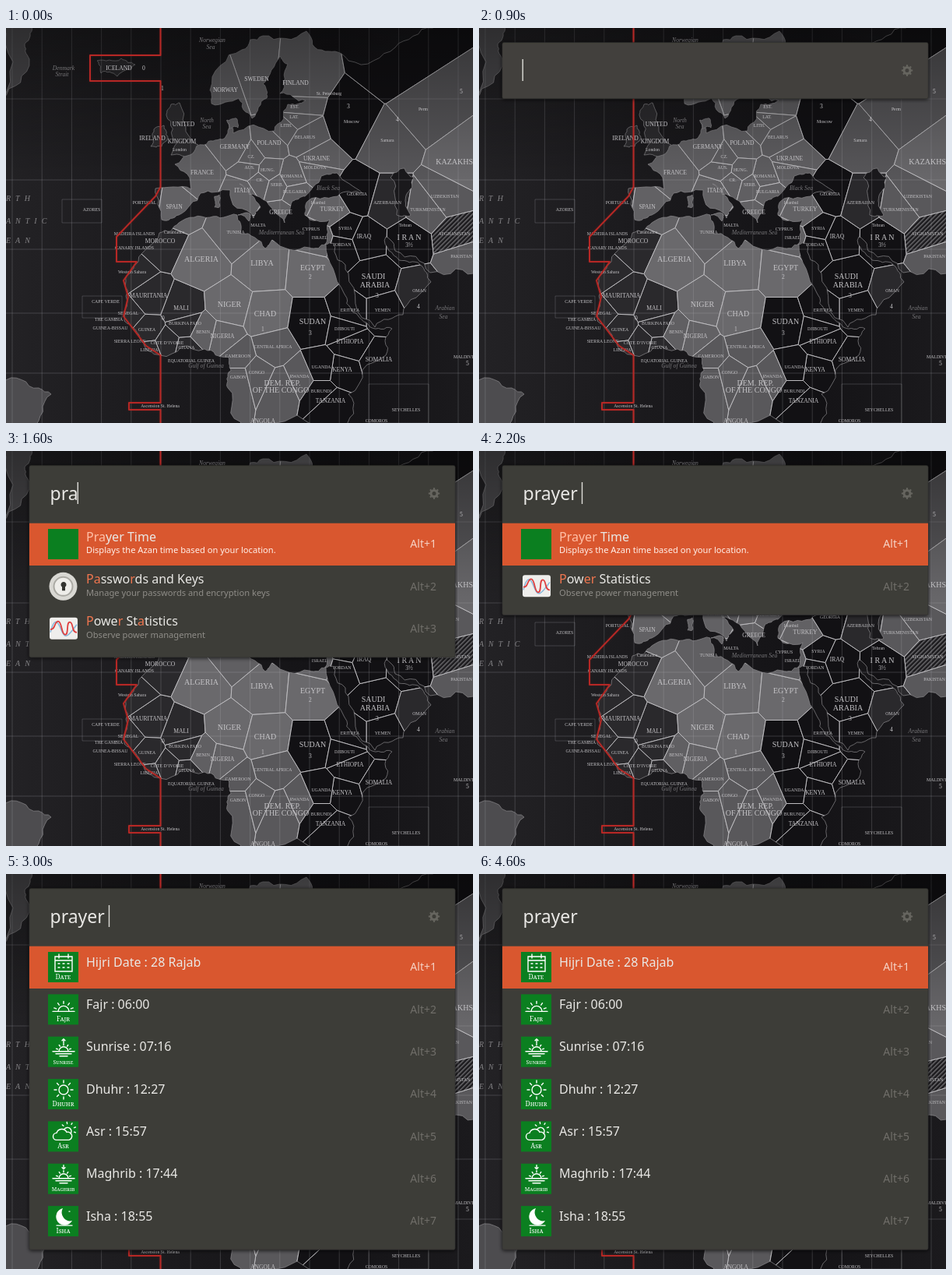
Animation of 600x507 px, one loop 4800 ms. Source, as an HTML page:

```html
<!DOCTYPE html>
<html lang="en">
<head>
<meta charset="utf-8">
<title>Launcher</title>
<style>
  html, body { margin: 0; width: 100%; height: 100%; overflow: hidden; background: #1b1a1d; }
  svg { display: block; width: 600px; height: 507px; }
  #countries { stroke: #bdbcbf; stroke-width: 1; }
  #coasts, #water { stroke: #8b8a8d; stroke-width: .7; stroke-linejoin: round; }
  #labels { font-family: "Liberation Serif", serif; fill: #c4c3c6; text-anchor: middle; }
  #labels .sea { font-style: italic; fill: #777679; }
  #ocean { font: italic 10px "Liberation Serif", serif; fill: #858487; letter-spacing: 6px; }
  #panel text { font-family: "Noto Sans", sans-serif; fill: #e9e8e5; white-space: pre; }
  #panel .query { font-size: 23px; }
  #panel .title { font-size: 16px; }
  #panel .title tspan { fill: #f0764f; }
  #panel .sub { font-size: 11.15px; fill: #8f8d88; }
  #panel .key { font-size: 14px; fill: #706e69; text-anchor: end; }
  #panel .on .title tspan { fill: #ffbfa6; }
  #panel .on .sub { fill: #fff0ea; }
  #panel .on .key { fill: #f6d3c6; }
  #panel .caption { font: small-caps 8.5px "Noto Serif", serif; fill: #fff; text-anchor: middle; }
  .line { fill: none; stroke: #fff; stroke-width: 1.4; stroke-linecap: round; }
</style>
</head>
<body>
<svg viewBox="0 0 600 507">
  <defs>
    <linearGradient id="sea">
      <stop offset="0" stop-color="#232225"/>
      <stop offset=".35" stop-color="#1b1a1d"/>
      <stop offset=".7" stop-color="#141316"/>
      <stop offset="1" stop-color="#1b1a1d"/>
    </linearGradient>
    <linearGradient id="dusk" x2="0" y2="1">
      <stop offset="0" stop-opacity=".4"/>
      <stop offset=".4" stop-opacity="0"/>
    </linearGradient>
    <pattern id="hatch" width="4" height="4" patternUnits="userSpaceOnUse" patternTransform="rotate(45)">
      <rect width="4" height="4" fill="#1b1a1d"/><rect width="1.5" height="4" fill="#6b6a6d"/>
    </pattern>
    <filter id="shadow" x="-10%" y="-20%" width="120%" height="140%">
      <feDropShadow dx="0" dy="1" stdDeviation="2.5" flood-color="#000" flood-opacity=".75"/>
    </filter>
    <clipPath id="land"><path id="landShape"/></clipPath>
  </defs>
  <rect width="600" height="507" fill="url(#sea)"/>
  <g id="countries" clip-path="url(#land)"></g>
  <g id="coasts"></g>
  <g id="water" fill="#1a191c"></g>
  <path id="grid" stroke="#b5b4b7" stroke-width=".8" opacity=".3"/>
  <rect width="600" height="507" fill="url(#dusk)"/>
  <g id="labels"></g>
  <g id="ocean"><text y="222">RTH</text><text y="251">ANTIC</text><text y="276">EAN</text></g>
  <g fill="none" stroke-linejoin="round">
    <path id="route" stroke="#b62825" stroke-width="2" d="M198.5 0V35H108V68H198.5V204L192 216 142 268V300H168L151 324 157 345 151 370 180 408 198.5 420V481H158V490H198.5V507"/>
    <use href="#route" opacity=".25" style="filter: blur(1.5px)"/>
  </g>
  <g id="panel"></g>
</svg>
<script>
const $ = id => document.getElementById(id);
const DURATION = 4800;

// ---- Coasts: a few key points, broken up by seeded midpoint displacement ----
let seed = 7;
const random = () => (seed = seed * 16807 % 2147483647) / 2147483647;

function roughen(a, b, depth) {
  if (!depth) return [b];
  const shift = (random() - .5) * .35;
  const middle = [(a[0] + b[0]) / 2 + (b[1] - a[1]) * shift, (a[1] + b[1]) / 2 - (b[0] - a[0]) * shift];
  return [...roughen(a, middle, depth - 1), ...roughen(middle, b, depth - 1)];
}
const toPath = points => `M${points.map(p => p.map(n => n.toFixed(1)).join(' ')).join('L')}Z`;
function coast(text) {
  const points = text.split(' ').map(pair => pair.split(',').map(Number));
  return toPath(points.flatMap((p, i) => roughen(p, points[(i + 1) % points.length], 3)));
}

const africa = coast('197,263 222,250 262,243 297,240 301,264 333,283 342,272 390,282 411,277 434,340 446,365 468,384 496,386 488,420 440,470 440,520 308,520 285,462 289,440 285,422 255,412 198,420 175,402 152,376 154,325 170,300');
const europe = '192,206 238,207 217,175 255,150 278,143 284,118 292,135 345,132 362,98 385,93 352,84 362,46 352,36 330,72 335,90 316,116 299,90 264,97 262,80 303,28 330,10 386,4 410,30 440,42 500,25 548,0';
const asia = '610,-9 610,318 545,314 500,286 488,268 505,298 532,304 546,326 510,368 474,384 440,315 420,276 410,278 416,246 384,240 388,222 430,212 458,212 425,186 405,190 384,216 368,222 358,250 330,220 300,200 327,230 318,244 288,208 250,212 222,240 200,246';
const mainland = coast(`${europe} ${asia}`);
const islands = {
  '#4d4c4f': ['-5,-5 34,-5 26,18 30,40 -5,92', '-5,455 42,462 58,470 32,512 -5,512'],
  '#2d2c2f': ['212,98 223,96 247,150 240,161 212,163 219,148 206,112', '190,130 203,125 208,140 200,152 186,152', '117,42 148,39 166,47 143,62 122,58'],
  '#605f62': ['268,216 274,214 274,230 268,230', '298,240 314,239 312,248', '284,118 296,116 298,128 286,130']
};
const caspian = coast('494,192 512,180 524,192 514,215 520,240 502,240');

// ---- Countries: "name x y" items; the nearest name owns the land ----
const BIG = 10, MID = 7.6, TINY = 5.8;
const zones = [
  ['#2a292c', MID, 'MALI 225 362|MAURITANIA 183 346|MOROCCO 198 276'],
  ['#2a292c', TINY, 'PORTUGAL 178 226|Western Sahara 162 315|SENEGAL 157 368|GUINEA 181 389|LIBERIA 184 415|COTE D’IVOIRE 207 406|GHANA 232 412|BURKINA FASO 230 381'],
  ['#6a696c', BIG, 'ALGERIA 251 300|LIBYA 329 305|NIGER 287 358|CHAD 333 370|EGYPT 394 311'],
  ['#626164', MID, 'SWEDEN 322 68|NORWAY 282 82|FINLAND 372 73|SPAIN 216 232|FRANCE 252 188|GERMANY 294 155|POLAND 338 150|UKRAINE 399 170|ITALY 304 211|GREECE 353 239|TURKEY 419 235|NIGERIA 278 398'],
  ['#605f62', TINY, 'BELARUS 384 142|ROMANIA 367 192|BULGARIA 371 212|MOLDOVA 397 181|HUNG. 336 184|AUS. 313 181|CZ. 315 167|CR. 326 197|SERB. 348 203|EST. 371 103|LAT. 370 116|LITH. 360 127|TUNISIA 295 264|ISRAEL 403 271|BENIN 253 392'],
  ['#59585b', BIG, 'DEM. REP. 355 459'],
  ['#59585b', TINY, 'CENTRAL AFRICA 343 411|CAMEROON 298 423|GABON 298 450|CONGO 322 444|RWANDA 377 449'],
  ['#121114', BIG, 'SUDAN 394 380|SAUDI 472 322|I R A N 518 272'],
  ['#121114', MID, 'IRAQ 460 270|ETHIOPIA 442 405|KENYA 432 441|TANZANIA 417 481|SOMALIA 479 428'],
  ['#121114', TINY, 'SYRIA 436 259|JORDAN 432 280|YEMEN 484 364|ERITREA 442 364|DJIBOUTI 435 388|UGANDA 405 437|BURUNDI 405 468|GEORGIA 451 215|Moscow 444 122| 500 50'],
  ['#2a292c', TINY, 'OMAN 531 339|AZERBAIJAN 490 226'],
  ['#59585b', TINY, 'Samara 490 146|Perm 536 106|TURKMENISTAN 542 235|UZBEKISTAN 564 218|PAKISTAN 585 295'],
  ['#6a696c', BIG, 'KAZAKHSTAN 586 175'],
  ['url(#hatch)', TINY, 'AFGHANISTAN 576 266']
];
const notes = [
  [BIG, '', 'ARABIA 474 333|OF THE CONGO 353 468'],
  [MID, '', 'ICELAND 145 54|UNITED 228 126|KINGDOM 226 148|IRELAND 188 144|ANGOLA 330 507|0 177 54|1 201 80|3 440 103|4 503 120|5 585 84|0 202 375|1 330 389|2 391 322|3 391 394|3 477 346|3½ 518 281|4 530 360|5 593 433'],
  [TINY, '', 'Casablanca 216 264|MALTA 324 255|CYPRUS 392 260|THE GAMBIA 132 376|GUINEA-BISSAU 134 387|SIERRA LEONE 159 404|EQUATORIAL GUINEA 238 429|CAPE VERDE 128 353|AZORES 110 235|MADEIRA ISLANDS 165 266|CANARY ISLANDS 165 284|London 223 158|Istanbul 401 226|Tehran 513 255|St. Petersburg 415 86|SEYCHELLES 514 492|COMOROS 476 506|Ascension St. Helena 198 487|MALDIVES 590 424'],
  [MID, 'sea', 'Denmark 74 54|Strait 72 62|Norwegian 265 18|Sea 263 27|North 258 121|Sea 258 129|Black Sea 414 208|Mediterranean Sea 354 265|Arabian 564 362|Sea 562 373|Gulf of Guinea 257 436']
];
const parse = list => list.split('|').map(item => {
  const [, name, x, y] = item.match(/^(.*) (\d+) (\d+)$/);
  return { name, x: +x, y: +y };
});
const seeds = zones.flatMap(([fill, size, list]) => parse(list).map(place => ({ ...place, fill, size })));
const remarks = notes.flatMap(([size, cls, list]) => parse(list).map(place => ({ ...place, cls, size })));

// Keeps the part of a polygon that lies nearer to a than to b.
function nearer(polygon, a, b) {
  const side = ([x, y]) => (x - b.x) ** 2 + (y - b.y) ** 2 - (x - a.x) ** 2 - (y - a.y) ** 2;
  return polygon.flatMap((p, i) => {
    const q = polygon[(i + 1) % polygon.length], sp = side(p), sq = side(q);
    const kept = sp >= 0 ? [p] : [];
    if (sp * sq < 0) kept.push(p.map((n, k) => n + (q[k] - n) * sp / (sp - sq)));
    return kept;
  });
}
const stage = [[-20, -20], [620, -20], [620, 527], [-20, 527]];
const cell = a => seeds.reduce((polygon, b) => a === b ? polygon : nearer(polygon, a, b), stage);

$('landShape').setAttribute('d', africa + mainland);
$('countries').innerHTML = seeds.map(s => `<path fill="${s.fill}" d="${toPath(cell(s))}"/>`).join('');
$('coasts').innerHTML = `<path fill="none" d="${africa + mainland}"/>` + Object.entries(islands)
  .map(([fill, shapes]) => `<path fill="${fill}" d="${shapes.map(coast).join('')}"/>`).join('');
$('water').innerHTML = `<path d="${caspian}"/>`;
$('labels').innerHTML = [...seeds, ...remarks].map(({ name, x, y, size, cls = '' }) =>
  `<text class="${cls}" font-size="${size}" x="${x}" y="${y}">${name}</text>`).join('');

let grid = 'M72 220h51v30H72ZM98 344h51v28H98ZM466 457h77v50h-77Z';
for (let x = 8; x < 600; x += 38.2) grid += `M${x} 0V507`;
for (const y of [91, 195, 284, 366, 443]) grid += `M0 ${y}H600`;
$('grid').setAttribute('d', grid);
$('grid').setAttribute('fill', 'none');

// ---- Icons, each in a 39 x 39 box ----
function rays(cx, cy, from, to, start, end, count) {
  let d = '';
  for (let i = 0; i < count; i++) {
    const a = (start + (end - start) * i / (count - 1)) * Math.PI / 180;
    const at = r => `${cx + r * Math.cos(a)} ${cy + r * Math.sin(a)}`;
    d += `M${at(from)}L${at(to)}`;
  }
  return d;
}
const line = d => `<path class="line" d="${d}"/>`;
const tile = (caption, art) => `<rect width="39" height="39" fill="#0b7f20"/>${art}<text class="caption" x="19.5" y="35">${caption}</text>`;
const small = text => `<tspan font-size="7">${text}</tspan>`;
const halfSun = line('M13 22a7 7 0 0 1 14 0M6 22H34' + rays(20, 22, 10, 13, 200, 340, 5));
const seaSun = line('M14 19a6 6 0 0 1 12 0M6 19H34M10 22H30M15 25H25' + rays(20, 19, 8, 10, 200, 340, 5));

const icons = {
  circle: '<circle cx="19.5" cy="19.5" r="18" fill="#ff6c37"/>',
  prayer: '<rect width="39" height="39" fill="#0b7f20"/>',
  help: '<circle cx="19.5" cy="19.5" r="18" fill="#4b91c9" stroke="#79b1dc"/><text x="19.5" y="29" font-size="27" text-anchor="middle">?</text>',
  paste: '<rect x="4" y="5" width="23" height="27" rx="2" fill="#b8b7b3"/><rect x="10" y="2" width="11" height="7" rx="2" fill="#74736f"/><path d="M14 13H35V31L30 36H14Z" fill="#f4f3f1"/><path d="M18 18H31M18 22H31M18 26H31M18 30H26" stroke="#c0bfbc"/>',
  keys: '<circle cx="19.5" cy="19.5" r="18" fill="#d9d8d3"/><circle cx="19.5" cy="19.5" r="12" fill="#eeede9" stroke="#aaa9a3" stroke-width="2"/><path d="M18 25V20a3.5 3.5 0 1 1 4 0V25Z" fill="#33332f"/>',
  power: '<rect x="2" y="5" width="36" height="28" rx="3" fill="#efeeec"/><path d="M3 24C8 5 12 8 17 21S26 29 37 14" fill="none" stroke="#86b7da" stroke-width="1.5"/><path d="M3 20C9 22 8 10 13 10S17 27 22 27 23 11 28 11 30 25 37 24" fill="none" stroke="#df3e3e" stroke-width="1.8"/>',
  date: tile('Date', line('M9 6H31V25H9ZM9 11H31M14 3V8M26 3V8M13 15h2M19 15h2M25 15h2M13 20h2M19 20h2M25 20h2')),
  fajr: tile('Fajr', halfSun),
  sunrise: tile(small('Sunrise'), seaSun + line('M20 8V3M18 5l2-2 2 2')),
  dhuhr: tile('Dhuhr', line('M14 14a6 6 0 1 0 12 0a6 6 0 1 0-12 0' + rays(20, 14, 9, 12, 0, 315, 8))),
  asr: tile('Asr', line('M11 24a4.5 4.5 0 0 1 0-9a7 7 0 0 1 13-1a5 5 0 0 1 3 10ZM21 10a5 5 0 1 1 8 6' + rays(26, 11, 8, 10, 220, 380, 5))),
  maghrib: tile(small('Maghrib'), seaSun + line('M20 2V7M18 5l2 2 2-2')),
  isha: tile('Isha', '<path d="M19 3A11 11 0 1 0 31 19A11 11 0 0 1 19 3Z" fill="#fff"/>' + line('M11 25H31M27 7h1'))
};

// ---- Launcher: brackets mark matched letters ----
const about = {
  prayer: 'Displays the Azan time based on your location.', help: 'Get help with GNOME', paste: 'Manage your clipboard history',
  keys: 'Manage your passwords and encryption keys', power: 'Observe power management'
};
const described = (icon, title) => [icon, title, about[icon]];
const times = [['date', 'Hijri Date : 28 Rajab'], ['fajr', 'Fajr : 06:00'], ['sunrise', 'Sunrise : 07:16'], ['dhuhr', 'Dhuhr : 12:27'],
  ['asr', 'Asr : 15:57'], ['maghrib', 'Maghrib : 17:44'], ['isha', 'Isha : 18:55']];

const steps = [
  { at: 0, opacity: 0 },
  { at: 700, opacity: .35 },
  { at: 800, opacity: .7 },
  { at: 900 },
  { at: 1400, query: 'p', rows: [['circle', '[P]limtor'], described('prayer', '[P]rayer Time'), described('help', 'Hel[p]'), described('paste', 'G[P]aste')] },
  { at: 1500, query: 'pr', rows: [described('prayer', '[Pr]ayer Time'), described('keys', '[P]asswo[r]ds and Keys'), described('power', '[P]owe[r] Statistics')] },
  { at: 1600, query: 'pra', rows: [described('prayer', '[Pra]yer Time'), described('keys', '[Pa]sswo[r]ds and Keys'), described('power', '[P]owe[r] St[a]tistics')] },
  { at: 2200, query: 'prayer ', rows: [described('prayer', '[Prayer] Time'), described('power', '[P]ow[er] Statistics')] },
  { at: 2500, query: 'prayer ', rows: [['prayer', 'Loading...']] },
  { at: 3000, query: 'prayer ', rows: times }
];

function rowMarkup([icon, title, sub], i) {
  const marked = title.replace(/\[/g, '<tspan>').replace(/\]/g, '</tspan>');
  return `<g class="${i ? '' : 'on'}" transform="translate(30 ${92.7 + i * 54.35})">
    ${i ? '' : '<rect width="547" height="54.3" fill="#d9572f"/>'}
    <g transform="translate(24 7.3)">${icons[icon]}</g>
    <text class="title" x="73" y="${sub ? 23 : 26}">${marked}</text>
    ${sub ? `<text class="sub" x="73" y="38.5">${sub}</text>` : ''}
    <text class="key" x="523" y="31.5">Alt+${i + 1}</text></g>`;
}

function showStep({ opacity = 1, query = '', rows = [] }) {
  const height = rows.length ? 83 + rows.length * 54.35 : 72;
  $('panel').setAttribute('opacity', opacity);
  $('panel').innerHTML = `<rect x="30" y="18.7" width="547" height="${height}" rx="2" fill="${rows.length ? '#3d3c38' : '#42413c'}" stroke="#302f2c" stroke-width=".6" filter="url(#shadow)"/>
    <circle cx="550" cy="54.5" r="4" fill="none" stroke="#66655f" stroke-width="3"/>
    <path d="${rays(550, 54.5, 5, 7.2, 0, 315, 8)}" stroke="#66655f" stroke-width="2.2"/>
    <text class="query" id="query" x="56.5" y="63" xml:space="preserve">${query}</text>
    <rect id="caret" y="40" width="1.4" height="28" fill="#deddd9"/>${rows.map(rowMarkup).join('')}`;
  $('caret').setAttribute('x', 55.5 + (query ? $('query').getComputedTextLength() : 0));
}

const began = performance.now();
let shown;
function frame() {
  const t = (performance.now() - began) % DURATION;
  const step = steps.findLast(s => s.at <= t);
  if (step !== shown) showStep(shown = step);
  // Once the list is up, the caret blinks: 800 ms lit, 400 ms dark.
  const caretOff = t >= 3000 && (t - 2600) % 1200 >= 800;
  $('caret').setAttribute('visibility', caretOff ? 'hidden' : 'visible');
  requestAnimationFrame(frame);
}
frame();
</script>
</body>
</html>
```
